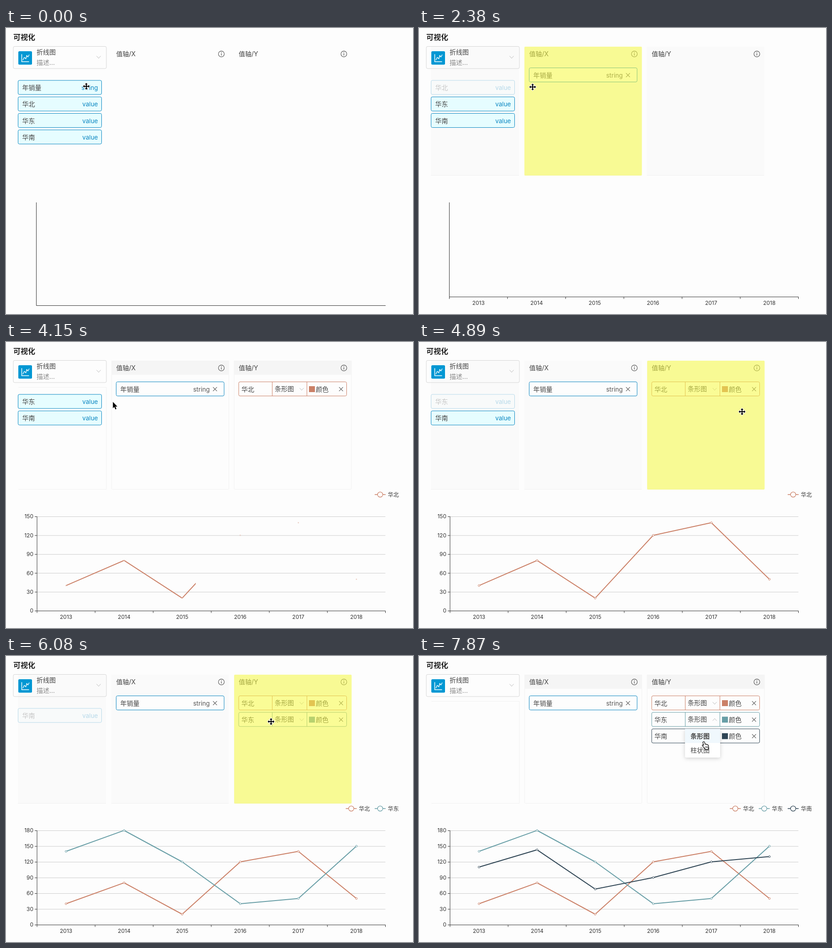
Recreate the animation shown at these times as an HTML page. Size 892x628 px, loop 8000 ms.

```html
<!DOCTYPE html>
<html lang="zh">
<head>
<meta charset="utf-8">
<style>
html, body { margin: 0; width: 100%; height: 100%; overflow: hidden; background: #fdfdfd; }
svg { display: block; width: 892px; height: 628px; font: 14px Inter, "Noto Sans CJK SC", "Noto Sans CJK", sans-serif; }
</style>
</head>
<body>
<svg id="stage" viewBox="0 0 892 628"></svg>
<script>
const stage = document.getElementById('stage');
const LOOP = 8000, STEP = 148.4, LAST = 53;
const BLUE = '#0a86c1', INK = '#444', AXIS = '#333';
const PITCH = 36.25;

const fields = ['年销量', '华北', '华东', '华南'];
const series = [
  { name: '华北', color: '#cb8067', born: 3700, data: [40, 80, 20, 120, 140, 50] },
  { name: '华东', color: '#689ea6', born: 5050, data: [140, 180, 120, 40, 50, 150] },
  { name: '华南', color: '#2f4554', born: 6353, data: [110, 143, 68, 90, 120, 130] }
];
// from: drag begins, out: highlight ends, drop: field lands
const drags = [
  { from: 2, out: 6, drop: 7 },
  { from: 14, out: 24, drop: 25 },
  { from: 30, out: 34, drop: 34 },
  { from: 40, out: 43, drop: 43 }
];
const path = [
  [0, 176, 128], [1, 176, 128], [4, 363, 126], [7, 363, 126], [12, 182, 130],
  [14, 182, 130], [22, 611, 127], [24, 611, 127], [29, 190, 132], [30, 190, 132],
  [33, 708, 153], [34, 708, 153], [38, 195, 135], [39, 195, 135], [42, 716, 147],
  [45, 717, 147], [50, 644, 142], [51, 640, 148], [53, 624, 188]
];

const clamp = v => Math.max(0, Math.min(1, v));
const mix = (a, b, p) => a + (b - a) * p;

const text = (x, y, s, fill = INK, more = '') => `<text x="${x}" y="${y}" fill="${fill}" ${more}>${s}</text>`;
const latin = (x, y, s, fill) => text(x, y, s, fill, 'text-anchor="end" font-size="13.5"');
const rect = (x, y, w, h, fill, stroke = 'none', r = 0, more = '') =>
  `<rect x="${x}" y="${y}" width="${w}" height="${h}" rx="${r}" fill="${fill}" stroke="${stroke}" ${more}/>`;
const line = (d, stroke, w = 1, more = '') => `<path d="${d}" fill="none" stroke="${stroke}" stroke-width="${w}" ${more}/>`;
const circle = (x, y, r, stroke, w = 1, fill = '#fff') =>
  `<circle cx="${x}" cy="${y}" r="${r}" fill="${fill}" stroke="${stroke}" stroke-width="${w}"/>`;
const cross = (x, y) => line(`M${x - 4.3} ${y - 4.3}l8.6 8.6m0-8.6l-8.6 8.6`, '#555', 1.1);
const chevron = (x, y, up) => {
  const d = up ? -5 : 5;
  return line(`M${x - 4.5} ${y - d / 2}l4.5 ${d}l4.5 ${-d}`, '#bbb');
};

function cursorAt(k) {
  let i = 1;
  while (i < path.length - 1 && path[i][0] < k) i++;
  const [a, ax, ay] = path[i - 1], [b, bx, by] = path[i];
  const p = clamp((k - a) / (b - a)), e = p * p * (3 - 2 * p);
  return { x: mix(ax, bx, e), y: mix(ay, by, e) };
}

function cursor({ x, y }, kind) {
  const at = `transform="translate(${x} ${y})"`;
  if (kind === 'move') {
    const d = 'M0-7.5l3 3.4h-2v3.1h3.1v-2L7.5 0l-3.4 3v-2H1v3.1h2L0 7.5l-3-3.4h2V1h-3.1v2L-7.5 0l3.4-3v2H-1v-3.1h-2z';
    return `<path ${at} d="${d}" stroke="#fff" stroke-width="2" paint-order="stroke" stroke-linejoin="round"/>`;
  }
  if (kind === 'hand') {
    const d = 'M0 0c1.500 0 2 1 2.200 2l.9 4c.5-1 2.200-1 2.600.4 1-.7 2.200-.2 2.400.8 1-.4 2 .1 2.300 1.300.6 2.500.6 4.500-.3 6.300v2.500H3v-1.800C1 13.500-1.500 11-3 8.800-3.700 7.500-2 6.700-1 7.500l.8.8L-1.800 2C-2.200.8-1.200 0 0 0z';
    return `<path ${at} d="${d}" fill="#fff" stroke="#000" stroke-width="1.200" stroke-linejoin="round"/>` +
      `<path ${at} d="M4 10l.6 4m1.700-4l.5 4m1.700-4l.3 4" stroke="#000" stroke-width=".8"/>`;
  }
  return `<path ${at} d="M.5 0v14l3.100-3 2.300 5.500 2.400-1L6 10.200h4.300z" stroke="#fff" stroke-width="1.600" paint-order="stroke" stroke-linejoin="round"/>`;
}

function picker() {
  return text(16, 26, '可视化', '#222', 'font-size="16" font-weight="600"') +
    rect(16, 40.5, 204, 48.5, 'none', '#d6d6d6', 3) +
    rect(27, 51, 30, 29.5, '#0097d3', 'none', 2.5) +
    line('M34.500 57.500v16.500h16', '#fff', 1.500) +
    line('M37 70.500l3-6 3.500 3 2-7 2.500 3 3-5', '#fff', 1.400) +
    text(67, 58, '折线图') + text(67, 80.5, '描述...', '#888') + chevron(203, 64);
}

function info(x) {
  return circle(x, 57, 6.4, '#555', 1.1, 'none') + rect(x - .6, 55.8, 1.2, 4.6, '#555') + rect(x - .7, 53.2, 1.4, 1.4, '#555');
}

function panel(x, label, mode) {
  let s = '';
  if (mode === 'drag') s += rect(x, 41, 257, 282, '#fafafa') + line(`M${x} 323.500h257`, '#f0f0f0');
  if (mode === 'rest' || mode === 'lit') {
    s += rect(x + .5, 41.5, 257, 282, mode === 'lit' ? '#fafafa' : 'none', '#f2f2f2', 2) + rect(x, 41, 258, 31, '#f5f5f5');
  }
  return s + text(x + 10.5, 62, label) + info(x + 241);
}

function sourceList(gone, held) {
  return fields.slice(gone).map((name, i) => {
    const y = 115 + i * PITCH, faded = held && i === 0;
    return `<g opacity="${faded ? .28 : 1}">` +
      rect(26.5, y, 183, 31, faded ? '#f4fbfb' : '#e6fdff', BLUE, 3) +
      text(35.5, y + 21, name) + latin(201.5, y + 21, 'value'.replace(/.*/, m => gone + i ? m : 'string').slice(0, gone + i ? 5 : 6), BLUE) + '</g>';
  }).join('');
}

function seriesRow(s, i, open) {
  const y = 87.5 + i * PITCH;
  return rect(510, y, 236.5, 31, '#fdfdfd', s.color, 3) +
    line(`M583.500 ${y}v31M659.500 ${y}v31`, s.color) +
    text(516, y + 21, s.name) + text(589, y + 20.5, '条形图') + chevron(648, y + 16, open) +
    rect(664, y + 9.5, 13, 13, s.color) + text(679, y + 21, '颜色') + cross(734.3, y + 16);
}

function menu() {
  return rect(583, 160, 77, 63, '#fff', 'none', 3, 'style="filter:drop-shadow(0 2px 4px rgba(0,0,0,.18))"') +
    rect(583, 160, 77, 31, '#f0f8fd') +
    text(595, 180.5, '条形图', INK, 'font-weight="600"') + text(595, 211.5, '柱状图');
}

function xAxis(x0) {
  const w = (831.5 - x0) / 6;
  let d = `M${x0} 383V590M${x0} 590.500H832`, s = '';
  for (let i = 0; i < 7; i++) {
    d += `M${x0 + i * w} 590v5`;
    if (i < 6) s += text(x0 + (i + .5) * w, 607.5, 2013 + i, AXIS, 'font-size="12" text-anchor="middle"');
  }
  return line(d, AXIS) + s;
}

function chart(now, live, stage) {
  if (!stage) return line('M66.500 383V609.500H832', AXIS);
  if (!live.length) return xAxis(66.5);
  const top = live.length > 1 ? 180 : 150;
  // the first line eases onto the taller scale
  const p = 1 - Math.pow(1 - clamp((now - series[1].born) / 300), 3);
  const scale = live.length > 1 ? mix(150, 180, p) : 150;
  let s = '';
  for (let v = 0; v <= top; v += 30) {
    const y = 590 - v * 207 / top;
    if (v) s += line(`M68 ${y + .5}H831.500`, '#ccc');
    s += line(`M63 ${y + .5}h5`, AXIS) + text(60, y + 4.3, v, AXIS, 'font-size="12" text-anchor="end"');
  }
  s += xAxis(68);
  live.forEach((l, i) => {
    const grow = clamp((now - l.born) / 1000);
    const pts = l.data.map((v, j) => [131.5 + 127.3 * j, 590 - v * 207 / (i ? 180 : scale)]);
    s += `<clipPath id="c${i}">${rect(68, 370, 764 * grow, 230, '#000')}</clipPath>` +
      line('M' + pts.join('L'), l.color, 2, `clip-path="url(#c${i})" stroke-linejoin="bevel"`);
    s += `<g>${pts.map(q => circle(q[0], q[1], 2 * grow, l.color, grow)).join('')}</g>`;
    const x = 820 - 63.4 * (live.length - 1 - i);
    s += line(`M${x - 12} 335h24`, l.color, 1.5) + circle(x, 335, 5.7, l.color, 1.2) +
      text(x + 17, 339.5, l.name, AXIS, 'font-size="12"');
  });
  return s;
}

function render(k) {
  const now = k * STEP, pos = cursorAt(k);
  const gone = drags.filter(d => k >= d.drop).length;
  const held = drags.some(d => k >= d.from && k < d.drop);
  const dragging = drags.some(d => k >= d.from && k < d.out);
  const live = series.slice(0, Math.max(0, gone - 1));
  const open = k >= 51;

  let s = '';
  if (dragging) s += rect(26, 41, 193, 282, '#fafafa') + line('M26 323.500h193', '#f0f0f0');
  else if (k >= 6) s += line('M27 99.500H220V323.500H27', '#f1f1f1');

  const xMode = k < 6 ? '' : dragging ? 'drag' : k === 6 ? 'lit' : 'rest';
  const yMode = k < 14 ? '' : dragging ? 'drag' : 'rest';
  s += panel(231, '值轴/X', xMode) + panel(499.5, '值轴/Y', yMode);
  s += picker() + sourceList(gone, held);

  if (gone) {
    s += rect(241.5, 87.5, 236.5, 31, '#fdfdfd', BLUE, 3) + text(250.5, 108.5, '年销量') +
      latin(446.5, 108.5, 'string', '#555') + cross(458, 103.5);
  }
  live.forEach((l, i) => { s += seriesRow(l, i, open && i === 1); });
  s += chart(now, live, gone);

  const over = !dragging ? 0 : pos.x > 500 ? 500 : pos.x > 231 && pos.x < 488 ? 231 : 0;
  if (over) s += rect(over, 41, 257.5, 283, '#f8fb42', 'none', 2, 'opacity=".55"');
  if (open) s += menu();

  const onField = pos.x < 210 && gone < 4;
  s += cursor(pos, dragging || onField ? 'move' : k >= 50 ? 'hand' : 'arrow');
  stage.innerHTML = s;
}

const start = performance.now();
let shown = -1;
function tick() {
  const t = (performance.now() - start) % LOOP;
  const k = Math.min(LAST, Math.floor((t + 14) / STEP));
  if (k !== shown) render(shown = k);
  requestAnimationFrame(tick);
}
tick();
</script>
</body>
</html>
```
